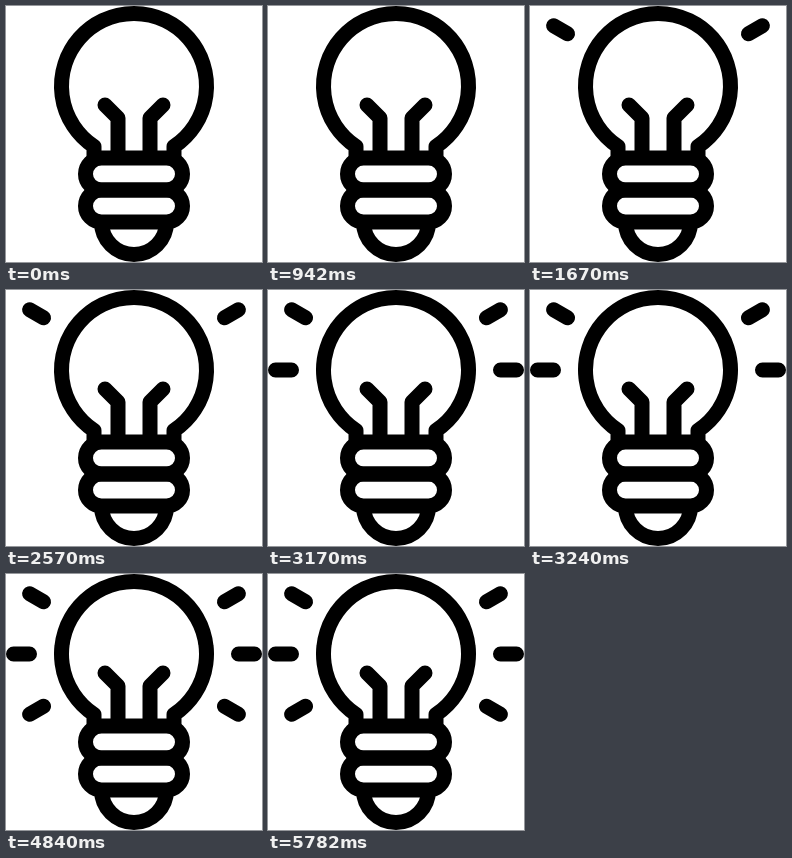
Animation of 256 by 256 pixels, one loop 6410 ms. Source, as an HTML page:

```html
<!DOCTYPE html>
<html lang="en">
<head>
<meta charset="utf-8">
<title>Light bulb</title>
<style>
  html, body { margin: 0; width: 100%; height: 100%; overflow: hidden; background: #fff; }
  svg { display: block; width: 100%; height: 100%; }
</style>
</head>
<body>
<svg viewBox="0 0 256 256" fill="none" stroke="#000" stroke-width="15"
     stroke-linecap="round" stroke-linejoin="round">
  <!-- glass -->
  <path stroke-linecap="butt" d="M88 152V140.47A72.5 72.5 0 1 1 168 140.47V152"/>
  <!-- filament -->
  <path d="M99 99L112 112V148M157 99L144 112V148"/>
  <!-- screw and base -->
  <rect x="79.5" y="152" width="97" height="32" rx="16"/>
  <rect x="79.5" y="184" width="97" height="32" rx="16"/>
  <path stroke-linecap="butt" d="M95.5 216A32.5 32.5 0 0 0 160.5 216"/>
  <g id="rays"></g>
</svg>
<script>
const LOOP = 6410;
const pairs = [
  { angle: -30, start: 1570 },
  { angle: 0, start: 3170 },
  { angle: 30, start: 4740 }
];
const rays = document.getElementById('rays');

// A mirrored pair of rays pointing away from the centre of the glass
for (const pair of pairs) {
  const a = pair.angle * Math.PI / 180;
  const ray = side => {
    const at = r => `${128 + side * r * Math.cos(a)} ${80 + r * Math.sin(a)}`;
    return `M${at(104.5)}L${at(120.5)}`;
  };
  pair.path = document.createElementNS('http://www.w3.org/2000/svg', 'path');
  pair.path.setAttribute('d', ray(-1) + ray(1));
  rays.append(pair.path);
}

function draw(now) {
  const t = now % LOOP;
  for (const { path, start } of pairs) {
    path.style.visibility = t >= start ? 'visible' : 'hidden';
  }
  requestAnimationFrame(draw);
}
draw(performance.now());
</script>
</body>
</html>
```
